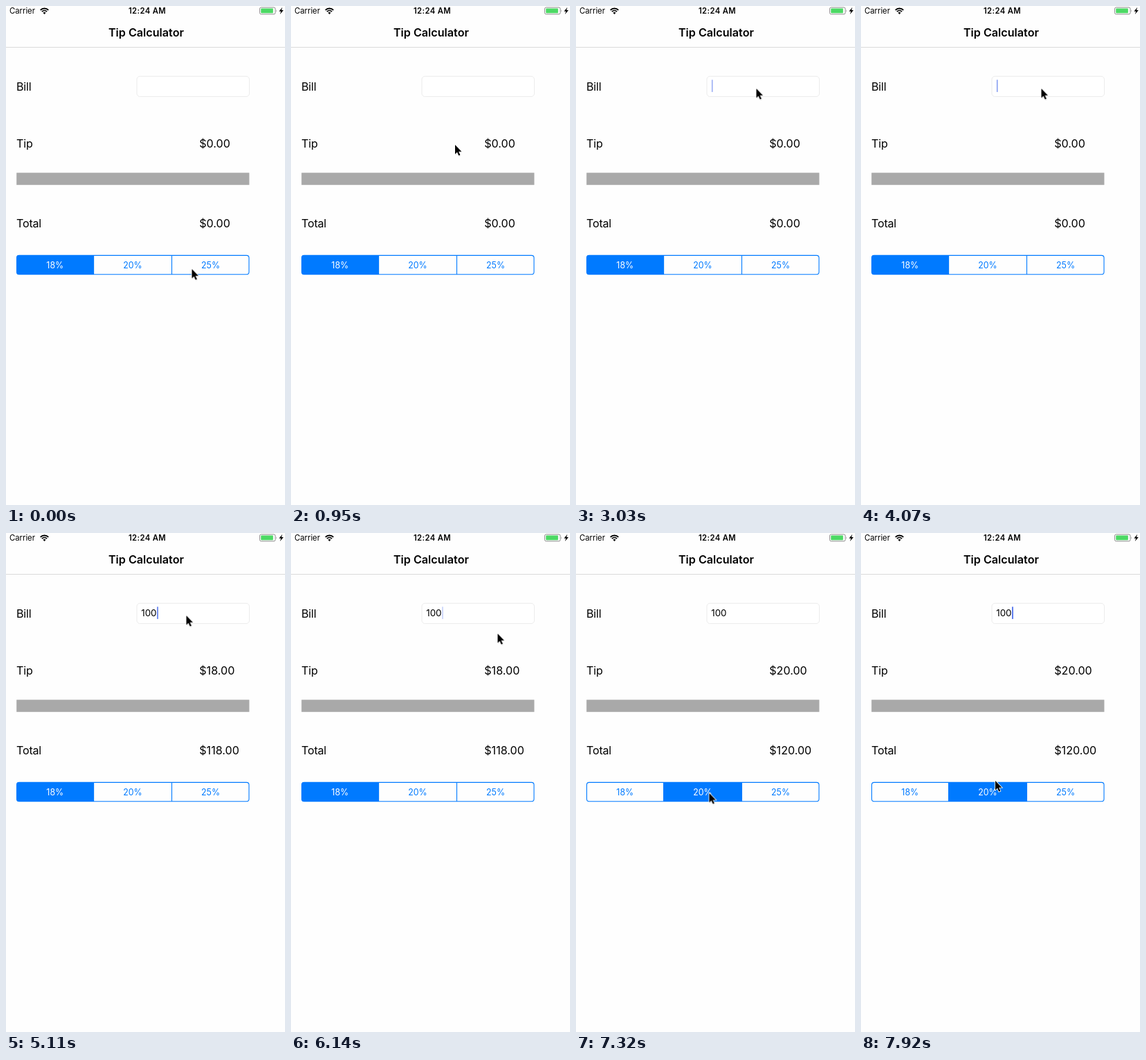
These frames come from a looping animation (403 px wide and 719 px high, 8000 ms). An HTML page:

```html
<!DOCTYPE html>
<html lang="en">
<head>
<meta charset="utf-8">
<title>Tip Calculator</title>
<style>
  html, body { margin: 0; height: 100%; overflow: hidden; background: #fefefe; }
  svg { display: block; width: 100vw; height: 100vh; }
  text { font: 16.1px Inter, "Liberation Sans", sans-serif; fill: #000; white-space: pre; }
  .label { letter-spacing: -.2px; }
  .title { font-size: 16.2px; font-weight: 600; letter-spacing: -.02px; text-anchor: middle; }
  .status { font-size: 11.3px; }
  .clock { font-weight: 600; letter-spacing: .35px; text-anchor: middle; }
  .field { font-size: 13.4px; }
  .seg text { font-size: 12.4px; fill: #007aff; text-anchor: middle; }
  .seg .line { fill: none; stroke: #007aff; stroke-width: 1.1; }

  .anim, .state, .seg .first, .seg .second { animation: 8s step-end infinite; }
  .state { opacity: 0; }
  .s0 { animation-name: s0; }
  .s1 { animation-name: s1; }
  .s2 { animation-name: s2; }
  .s3 { animation-name: s3; }
  .s4 { animation-name: s4; }
  @keyframes s0 { 0% { opacity: 1 } 52.75%, 100% { opacity: 0 } }
  @keyframes s1 { 0% { opacity: 0 } 52.75% { opacity: 1 } 54.625%, 100% { opacity: 0 } }
  @keyframes s2 { 0% { opacity: 0 } 54.625% { opacity: 1 } 56.375%, 100% { opacity: 0 } }
  @keyframes s3 { 0% { opacity: 0 } 56.375% { opacity: 1 } 91.5%, 100% { opacity: 0 } }
  @keyframes s4 { 0% { opacity: 0 } 91.5%, 100% { opacity: 1 } }

  /* selected segment */
  .pick { fill: #007aff; animation-name: pick; }
  .seg .first { animation-name: first; }
  .seg .second { animation-name: second; }
  @keyframes pick {
    0% { x: 15.5px; width: 111.5px }
    91.5%, 100% { x: 126.5px; width: 113px }
  }
  @keyframes first { 0% { fill: #fff } 91.5%, 100% { fill: #007aff } }
  @keyframes second { 0% { fill: #007aff } 91.5%, 100% { fill: #fff } }

  /* caret: position follows the typed digits, opacity blinks */
  .caret-pos { animation-name: caret-pos; }
  .caret { fill: #4065ea; animation-name: blink; }
  @keyframes caret-pos {
    0% { transform: translateX(195.9px) }
    52.75% { transform: translateX(202px) }
    54.625% { transform: translateX(210px) }
    56.375%, 100% { transform: translateX(218.1px) }
  }
  @keyframes blink {
    0% { opacity: 0 }
    23% { opacity: 1 }
    30.5% { opacity: .45 }
    32.375% { opacity: 0 }
    37.875% { opacity: .5 }
    39.75% { opacity: 1 }
    45.375% { opacity: 0 }
    50.875% { opacity: .6 }
    52.75% { opacity: 1 }
    63.875% { opacity: .85 }
    65.625% { opacity: 0 }
    69.375% { opacity: .5 }
    71.25% { opacity: 1 }
    76.75% { opacity: .3 }
    78.625% { opacity: 0 }
    82.25% { opacity: .6 }
    84.125% { opacity: 1 }
    89.625% { opacity: .5 }
    91.5% { opacity: 0 }
    95.25%, 100% { opacity: 1 }
  }

  .pointer { animation-name: move; }
  @keyframes move {
    0% { transform: translate(268.5px, 379px) }
    6.25% { transform: translate(266px, 366px) }
    8.125% { transform: translate(256px, 322px) }
    10% { transform: translate(244px, 262px) }
    11.75% { transform: translate(237px, 200px) }
    13.625% { transform: translate(241px, 155px) }
    15.5% { transform: translate(252px, 130px) }
    17.375% { transform: translate(260.5px, 119px) }
    74.875% { transform: translate(268px, 122px) }
    76.75% { transform: translate(298.5px, 145px) }
    78.625% { transform: translate(331px, 185px) }
    80.375% { transform: translate(346px, 240px) }
    82.25% { transform: translate(330px, 300px) }
    84.125% { transform: translate(283px, 345px) }
    86% { transform: translate(222px, 370px) }
    87.75% { transform: translate(192.5px, 374.8px) }
    99%, 100% { transform: translate(194px, 357px) }
  }
</style>
</head>
<body>
<svg viewBox="0 0 403 719" preserveAspectRatio="none">
  <defs>
    <clipPath id="round"><rect x="15" y="359" width="336.5" height="28" rx="4"/></clipPath>
    <path id="arrow" d="M0 0V13.4L3 10.6L5.2 15.6L7.4 14.7L5.2 9.8H9.4Z"/>
  </defs>

  <!-- status bar -->
  <text class="status" x="5" y="11.2">Carrier</text>
  <g fill="none" stroke="#000" stroke-width="1.9">
    <path d="M49.7 5.9A8.2 8.2 0 0 1 61.3 5.9"/>
    <path d="M51.9 8.1A5.1 5.1 0 0 1 59.1 8.1"/>
  </g>
  <path d="M55.5 12L53.5 9.8A2.8 2.8 0 0 1 57.5 9.8Z"/>
  <text class="status clock" x="204" y="11.2">12:24 AM</text>
  <rect x="366.5" y="2" width="22.5" height="9.8" rx="2" fill="none" stroke="#8f8f8f"/>
  <rect x="368.2" y="3.6" width="17.6" height="6.6" rx=".8" fill="#4cd964"/>
  <path d="M390.3 5.2Q391.8 7 390.3 8.8Z" fill="#8f8f8f"/>
  <path d="M399.2 1.8L394.4 7.7H397.2L395.8 12L400.8 6H397.9Z"/>

  <!-- navigation bar -->
  <text class="title" x="202.4" y="44.2">Tip Calculator</text>
  <rect y="59" width="403" height="1" fill="#dadada"/>

  <!-- form -->
  <text class="label" x="15" y="122.3">Bill</text>
  <text class="label" x="15" y="203.8">Tip</text>
  <text class="label" x="15" y="319.3">Total</text>
  <rect x="189" y="101.3" width="162.5" height="29.2" rx="4.5" fill="#fff" stroke="#ececec"/>
  <rect x="15.2" y="240.3" width="336.2" height="17.5" fill="#a9a9a9"/>

  <g class="state s0">
    <text x="279.3" y="203.8">$0.00</text>
    <text x="279.3" y="319.3">$0.00</text>
  </g>
  <g class="state s1">
    <text class="field" x="195.2" y="120.3">1</text>
    <text x="279.3" y="203.8">$0.18</text>
    <text x="279.3" y="319.3">$1.18</text>
  </g>
  <g class="state s2">
    <text class="field" x="195.2" y="120.3">10</text>
    <text x="279.3" y="203.8">$1.80</text>
    <text x="279.3" y="319.3">$11.80</text>
  </g>
  <g class="state s3">
    <text class="field" x="195.2" y="120.3">100</text>
    <text x="279.3" y="203.8">$18.00</text>
    <text x="279.3" y="319.3">$118.00</text>
  </g>
  <g class="state s4">
    <text class="field" x="195.2" y="120.3">100</text>
    <text x="279.3" y="203.8">$20.00</text>
    <text x="279.3" y="319.3">$120.00</text>
  </g>
  <g class="anim caret-pos"><rect class="anim caret" y="106.3" width="1.7" height="17.6"/></g>

  <!-- tip rates -->
  <g class="seg">
    <g clip-path="url(#round)"><rect class="anim pick" x="15.5" y="359" width="111.5" height="28"/></g>
    <rect class="line" x="15.5" y="359.4" width="335.5" height="27.4" rx="3.5"/>
    <path class="line" d="M126.6 359.4V386.8M239.5 359.4V386.8"/>
    <text class="first" x="70.8" y="377.6">18%</text>
    <text class="second" x="183" y="377.6">20%</text>
    <text x="295.6" y="377.6">25%</text>
  </g>

  <g class="anim pointer">
    <use href="#arrow" x=".6" y="1.3" opacity=".2"/>
    <use href="#arrow" stroke="#fff" stroke-width="1.6" paint-order="stroke"/>
  </g>
</svg>
</body>
</html>
```
